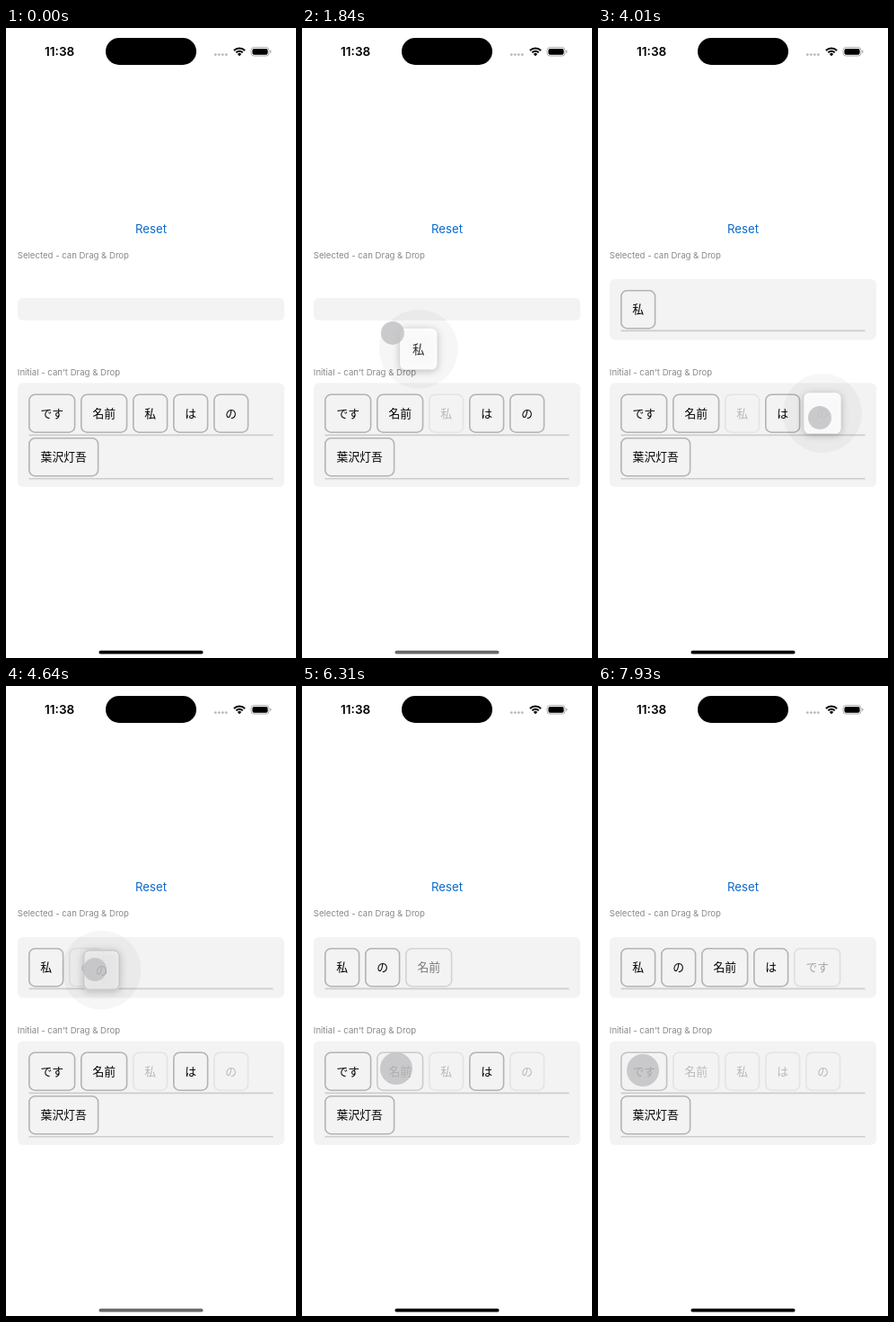
Write an HTML page with a canvas that moves like this. It is 323 px wide and 700 px high and loops after 8000 ms.

```html
<!DOCTYPE html>
<html lang="ja">
<head>
<meta charset="utf-8">
<style>
html, body { margin: 0; width: 100%; height: 100%; overflow: hidden; background: #fff; }
canvas { display: block; width: 323px; height: 700px; }
</style>
</head>
<body>
<canvas id="stage"></canvas>
<script>
const W = 323, H = 700, LOOP = 8000;
const canvas = document.getElementById('stage');
const ctx = canvas.getContext('2d');
const dpr = window.devicePixelRatio || 1;
canvas.width = W * dpr;
canvas.height = H * dpr;

const UI = 'Inter, "Liberation Sans", sans-serif';
const JP = '"Noto Sans CJK JP", "Noto Sans CJK", sans-serif';
const PANEL = '#f3f3f3', FADED = 0.24;
const TOP_Y = 291, LOW_Y = 406.5, CHIP_H = 43.5;

// Time, x, y of the touch point
const path = [
  [500, 117, 461], [780, 149, 438], [920, 157.5, 433], [1540, 157.5, 433],
  [1770, 127, 362], [1840, 101, 339], [2120, 93, 330], [2920, 93, 330],
  [3070, 195, 430], [3440, 195, 430], [3540, 247, 433], [4080, 247, 433],
  [4360, 170, 370], [4640, 99, 315], [5230, 99, 315], [5280, 113, 336],
  [5560, 113, 336], [5780, 80, 385], [6120, 105, 425], [6590, 105, 425],
  [6690, 206, 426], [7180, 206, 426], [7450, 73, 428], [7630, 73, 428],
  [7790, 50, 427], [8000, 50, 427]
];

// Two words are dragged, three are tapped
const words = [
  { text: 'です', tap: 7840 },
  { text: '名前', tap: 6170 },
  { text: '私', lift: 1350, hover: 2120, drop: 2660, gone: 2940, dx: [3, 2] },
  { text: 'は', tap: 6880 },
  { text: 'の', lift: 3870, hover: 4480, drop: 4910, gone: 5250, dx: [3, 0] }
];
const picked = [2, 4, 1, 3, 0].map(i => words[i]);
const drags = words.filter(w => w.lift);

const clamp = v => Math.max(0, Math.min(1, v));
const ramp = (t, a, b) => clamp((t - a) / (b - a));
const mix = (a, b, k) => a + (b - a) * k;
const chipW = text => 13 * text.length + 26.4;

function place(list, key) {
  let x = 25;
  for (const w of list) {
    w[key] = x;
    x += chipW(w.text) + 5.6;
  }
}
place(words, 'lowX');
place(picked, 'topX');

function slope(i, c) {
  const a = path[i - 1], b = path[i], d = path[i + 1];
  const rest = (p, q) => p[1] === q[1] && p[2] === q[2];
  if (!a || !d || rest(a, b) || rest(b, d)) return 0;
  return (d[c] - a[c]) / (d[0] - a[0]);
}

function touchAt(t) {
  if (t <= path[0][0]) return [path[0][1], path[0][2]];
  let i = 0;
  while (i < path.length - 2 && path[i + 1][0] <= t) i++;
  const p = path[i], q = path[i + 1], span = q[0] - p[0];
  const s = clamp((t - p[0]) / span), r = 1 - s;
  return [1, 2].map(c =>
    p[c] * (1 + 2 * s) * r * r + q[c] * s * s * (3 - 2 * s) +
    span * s * r * (slope(i, c) * r - slope(i + 1, c) * s));
}

function box(x, y, w, h, r, fill) {
  ctx.beginPath();
  ctx.roundRect(x, y, w, h, r);
  ctx.fillStyle = fill;
  ctx.fill();
}

function disc(x, y, r, fill) {
  ctx.beginPath();
  ctx.arc(x, y, r, 0, Math.PI * 2);
  ctx.fillStyle = fill;
  ctx.fill();
}

function label(text, x, y, font, color, align = 'left') {
  ctx.font = font;
  ctx.fillStyle = color;
  ctx.textAlign = align;
  ctx.textBaseline = 'alphabetic';
  ctx.fillText(text, x, y);
}

function word(text, x, y) {
  label(text, x, y + 4.7, '12.8px ' + JP, '#000', 'center');
}

function chip(text, x, y, alpha) {
  if (alpha <= 0) return;
  const w = chipW(text);
  ctx.save();
  ctx.globalAlpha = alpha;
  ctx.beginPath();
  ctx.roundRect(x + 0.8, y + 0.8, w - 1.6, CHIP_H - 1.6, 6.5);
  ctx.strokeStyle = '#b3b3b3';
  ctx.lineWidth = 1.6;
  ctx.stroke();
  word(text, x + w / 2, y + CHIP_H / 2);
  ctx.restore();
}

function rule(y, alpha = 1) {
  ctx.globalAlpha = alpha;
  box(25.5, y, 272, 1.6, 0, '#cdcdcd');
  ctx.globalAlpha = 1;
}

function statusBar() {
  label('11:38', 59.7, 31, '600 13.6px ' + UI, '#000', 'center');
  box(111, 11, 101, 30, 15, '#000');
  for (let i = 0; i < 4; i++) disc(233.3 + i * 4, 29.6, 1.4, '#b9b9b9');
  ctx.strokeStyle = '#000';
  ctx.lineWidth = 2;
  for (const r of [5.2, 8.6]) {
    ctx.beginPath();
    ctx.arc(260, 31, r, -Math.PI * 0.75, -Math.PI * 0.25);
    ctx.stroke();
  }
  ctx.beginPath();
  ctx.moveTo(260, 31.2);
  ctx.arc(260, 31, 3, -Math.PI * 0.75, -Math.PI * 0.25);
  ctx.fillStyle = '#000';
  ctx.fill();
  ctx.beginPath();
  ctx.roundRect(273, 21.5, 20, 9.6, 3.2);
  ctx.strokeStyle = '#a5a5a5';
  ctx.lineWidth = 0.9;
  ctx.stroke();
  box(274.4, 22.9, 17.2, 6.8, 2, '#000');
  box(294.2, 24.8, 1.1, 3, 0.6, '#a5a5a5');
}

function indicator(t) {
  const dim = ramp(t, 1560, 1760) - ramp(t, 3470, 3540) +
    ramp(t, 4200, 4400) - ramp(t, 5900, 6100);
  const g = Math.round(105 * dim);
  box(103.5, 691.8, 116, 3.8, 1.9, `rgb(${g},${g},${g})`);
}

function lowAlpha(w, t) {
  const k = w.tap ? ramp(t, w.tap, w.tap + 280) : ramp(t, w.lift, w.lift + 100);
  return mix(1, FADED, k);
}

function topAlpha(w, t) {
  if (w.tap) return ramp(t, w.tap, w.tap + 280);
  return mix(FADED * ramp(t, w.hover, w.hover + 140), 1, ramp(t, w.drop, w.drop + 70));
}

function preview(w, t) {
  if (t < w.lift || t > w.gone + 60) return;
  const up = ramp(t, w.lift, w.lift + 120);
  const ink = ramp(t, w.lift + 60, w.lift + 430);
  const over = ramp(t, w.hover, w.hover + 140);
  const out = ramp(t, w.drop, w.drop + 70);
  const [cx, cy] = touchAt(Math.min(t, w.drop) - 70);
  const x = cx + mix(w.dx[0], w.dx[1], over) - 20 * out;
  const y = cy - 5 - 20 * out;
  const alpha = mix(1, 0.12, out) * (1 - ramp(t, w.gone, w.gone + 60));
  const width = chipW(w.text);

  disc(x, y, 44 * mix(0.7, 1, up), `rgba(0,0,0,${0.035 * up * (1 - out)})`);
  ctx.save();
  ctx.translate(x, y);
  const size = mix(mix(1, 1.05, up), 0.49, out);
  ctx.scale(size, size);
  ctx.globalAlpha = alpha * up * mix(0.92, 0.75, over);
  ctx.shadowColor = `rgba(0,0,0,${0.28 * (1 - out)})`;
  ctx.shadowBlur = 8 * dpr;
  ctx.shadowOffsetY = 1.5 * dpr;
  box(-width / 2, -CHIP_H / 2, width, CHIP_H, 6, over > 0.5 ? '#f5f5f5' : '#fff');
  ctx.shadowColor = 'transparent';
  if (over > 0) {
    ctx.globalAlpha = alpha * over * 0.6;
    ctx.beginPath();
    ctx.roundRect(-width / 2 + 0.8, -CHIP_H / 2 + 0.8, width - 1.6, CHIP_H - 1.6, 6);
    ctx.strokeStyle = '#b3b3b3';
    ctx.lineWidth = 1.6;
    ctx.stroke();
  }
  ctx.globalAlpha = alpha * ink * mix(0.82, 0.6, over);
  word(w.text, 0, 0);
  ctx.restore();
}

function touch(t) {
  const alpha = ramp(t, 500, 570);
  if (!alpha) return;
  const press = drags.reduce((k, w) =>
    k + ramp(t, w.lift, w.lift + 80) - ramp(t, w.drop, w.drop + 70), 0);
  const [x, y] = touchAt(t);
  disc(x, y, mix(18, 13, press), `rgba(192,192,195,${0.82 * alpha})`);
}

function draw(t) {
  ctx.setTransform(dpr, 0, 0, dpr, 0, 0);
  ctx.fillStyle = '#fff';
  ctx.fillRect(0, 0, W, H);
  statusBar();
  label('Reset', 161.5, 227.6, '13.2px ' + UI, '#0a6bd0', 'center');
  label('Selected - can Drag & Drop', 12.8, 255.8, '9.6px ' + UI, '#878787');
  label("Initial - can't Drag & Drop", 12.8, 386, '9.6px ' + UI, '#878787');

  const open = ramp(t, 2120, 2260);
  const top = mix(300, 279, open);
  box(13, top, 297, mix(25, 67.5, open), 6, PANEL);
  if (open) rule(335.6, open);
  for (const w of picked) chip(w.text, w.topX, TOP_Y, topAlpha(w, t));

  box(13, 394.5, 297, 115.5, 6, PANEL);
  rule(451.6);
  rule(500);
  for (const w of words) chip(w.text, w.lowX, LOW_Y, lowAlpha(w, t));
  chip('葉沢灯吾', 25, 455, 1);

  for (const w of drags) preview(w, t);
  indicator(t);
  touch(t);
}

const start = performance.now();
function tick() {
  draw((performance.now() - start) % LOOP);
  requestAnimationFrame(tick);
}
tick();
</script>
</body>
</html>
```
